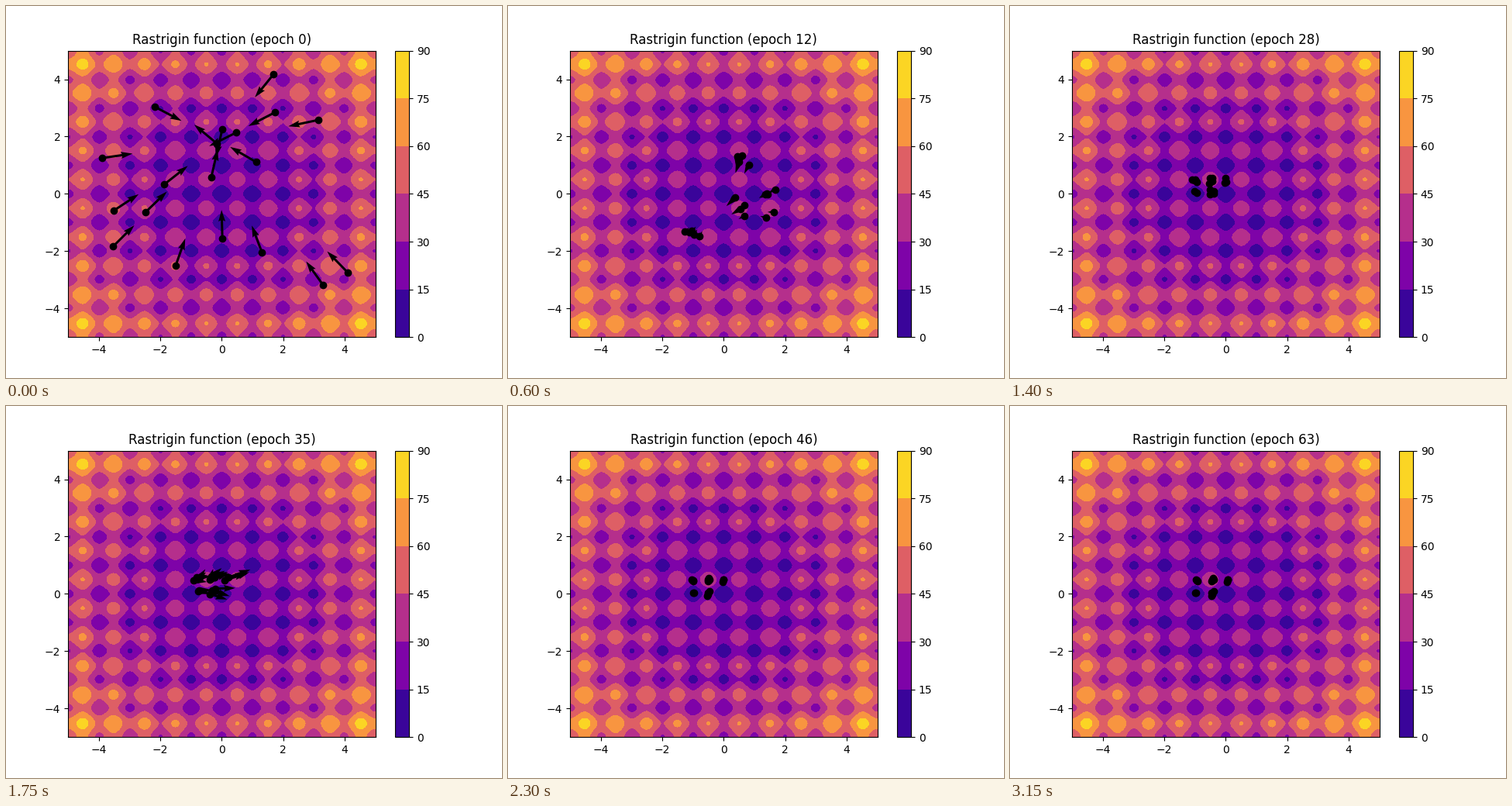
A matplotlib script for the animation above (3.2 s loop, 640 by 480 pixels).

```python
import numpy as np
import matplotlib.pyplot as plt
from matplotlib.animation import FuncAnimation

EPOCHS, INTERVAL = 64, 50
PULL = 0.7  # how far a particle's momentum bends its path
rng = np.random.default_rng(4)


def rastrigin(x, y):
    return (20 + x**2 - 10 * np.cos(2 * np.pi * x)
            + y**2 - 10 * np.cos(2 * np.pi * y))


def cloud(spread, *groups):
    """Particles scattered around centres given as (x, y, count)."""
    centres = np.repeat([g[:2] for g in groups], [g[2] for g in groups], axis=0)
    return centres + rng.normal(0, spread, centres.shape)


def unit(v):
    return v / np.maximum(np.linalg.norm(v, axis=1, keepdims=True), 1e-9)


# The last particle leads; all others head for it.
start = np.array([
    (-3.89, 1.25), (-2.18, 3.04), (-3.52, -0.59), (-3.53, -1.83),
    (-2.48, -0.64), (-1.87, 0.33), (-1.5, -2.51), (-0.34, 0.58),
    (0.02, 2.27), (0.47, 2.14), (1.12, 1.11), (1.68, 4.17), (1.74, 2.85),
    (3.14, 2.58), (0.02, -1.56), (1.31, -2.05), (3.3, -3.19), (4.1, -2.75),
    (-0.15, 1.75)])
start_v = unit(np.array([-0.07, 1.85]) - start)
start_v[-1] = -0.75, 0.67

# They overshoot and fly apart.
scatter = cloud(0.12, (0.62, 0.4, 4), (0.8, -0.35, 2), (-0.1, 0.22, 4),
                (-1.07, -0.3, 5), (-0.08, 1.15, 4))
scatter_v = 0.92 * unit(scatter - [-0.8, 0.4])

# They swing upwards together.
swing = cloud(0.09, (0.72, 0.95, 6), (-0.1, 0.32, 2), (0.45, 0.37, 2),
              (-0.2, 0.9, 5), (0.3, 0.95, 4))
swing_v = np.column_stack([0.5 - 0.38 * swing[:, 1], 0.85 - 0.15 * swing[:, 1]])

# Rest points lie halfway between each personal best and the global best.
best = np.array([-1, 0])
rest = cloud((0.03, 0.04), (0.02, 0.5, 3), (-0.49, 0, 4), (-0.5, 0.5, 6),
             (-1, 0, 2), (-1, 0.45, 4))
still = np.zeros_like(rest)
settle = rest + rng.normal(0, 0.05, rest.shape)

# A late kick drives them away from the global best.
reach = rest - best
kick = rest + rng.uniform(0.05, 0.3, (len(rest), 1)) * [1, 0.35]
kick_v = np.column_stack([0.3 + 0.35 * reach[:, 0], 0.75 * reach[:, 1] - 0.15])
kick_v += rng.normal(0, 0.12, rest.shape)

drift = np.minimum(np.linalg.norm(reach, axis=1, keepdims=True), 0.5) * [1, 0]

poses = [(0, start, start_v), (7, scatter, scatter_v), (18, swing, swing_v),
         (28, settle, still), (35, kick, kick_v), (46, rest, still),
         (63, rest + 0.14 * drift, still)]


def swarm(t):
    """Positions and velocities at epoch t, by cubic Hermite curves."""
    for (t0, p0, v0), (t1, p1, v1) in zip(poses, poses[1:]):
        if t <= t1:
            break
    h = t1 - t0
    u = (t - t0) / h
    ease = u * u * (3 - 2 * u)
    bend = u * (1 - u)**2 * v0 - u * u * (1 - u) * v1
    pos = p0 + (p1 - p0) * ease + PULL * h * bend
    vel = (6 * u * (1 - u) * (p1 - p0) / h
           + (1 - u) * (1 - 3 * u) * v0 + u * (3 * u - 2) * v1)
    if t0 == poses[-2][0]:
        pos = pos + 0.1 * drift * np.sin(4 * np.pi * u)
    speed = np.linalg.norm(vel, axis=1, keepdims=True)
    return pos, vel / np.maximum(speed, 1)


fig, ax = plt.subplots(figsize=(6.4, 4.8), dpi=100)
X, Y = np.meshgrid(*[np.linspace(-5, 5, 401)] * 2)
field = ax.contourf(X, Y, rastrigin(X, Y), levels=np.arange(0, 91, 15),
                    cmap="plasma")
fig.colorbar(field, ax=ax)

pos, vel = swarm(0)
dots = ax.scatter(*pos.T, color="black")
arrows = ax.quiver(*pos.T, *vel.T, color="black", angles="xy",
                   scale_units="xy", scale=1)
ax.set_xlim(-5, 5)
ax.set_ylim(-5, 5)
title = ax.set_title("Rastrigin function (epoch 0)")


def update(epoch):
    pos, vel = swarm(epoch)
    dots.set_offsets(pos)
    arrows.set_offsets(pos)
    arrows.set_UVC(*vel.T)
    title.set_text(f"Rastrigin function (epoch {epoch})")
    return dots, arrows, title


anim = FuncAnimation(fig, update, frames=EPOCHS, interval=INTERVAL,
                     repeat=True, repeat_delay=0)
plt.show()
```
